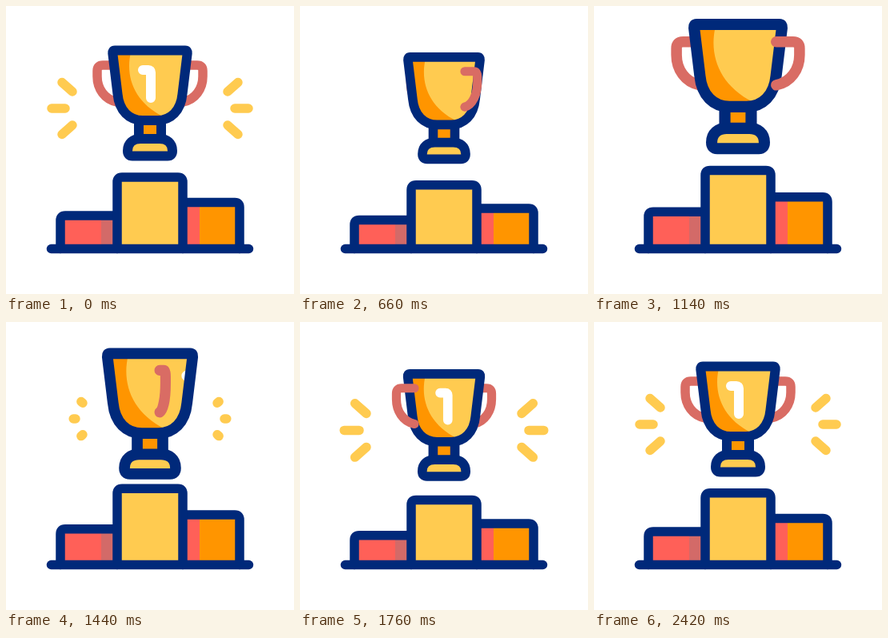
An HTML page that plays this animation: 360x360 px, repeating every 2.74 s.

```html
<!DOCTYPE html>
<html lang="en">
<head>
<meta charset="utf-8">
<title>Trophy on a podium</title>
<style>
  html, body { margin: 0; width: 100%; height: 100%; overflow: hidden; background: #fff; }
  svg { display: block; width: 100vw; height: 100vh; }
  .line, .handle, .digit { fill: none; stroke-width: 12; stroke-linecap: round; stroke-linejoin: round; }
  .line { stroke: #00297a; }
  .handle { stroke: #d96c64; stroke-width: 11.5; }
  .digit { stroke: #fff; }
  #podium .line { stroke-width: 11.5; }
  .ray { stroke: #ffcb50; stroke-linecap: round; }
  .yellow { fill: #ffcb50; }
  .orange { fill: #ff9500; }
  .red { fill: #ff6058; }
  .shadow { fill: #d36a68; }
</style>
</head>
<body>
<svg viewBox="0 0 360 360">
  <defs>
    <path id="cup" d="M136 55.500H224Q227 55.500 226.700 59L220.500 110C218.500 131 206 143 189 143H171C154 143 141.500 131 139.500 110L133.300 59Q133 55.500 136 55.500Z"/>
    <path id="foot" d="M152 181C152 171 159 166 168 166H192C201 166 208 171 208 181Q208 187.500 202 187.500H158Q152 187.500 152 181Z"/>
    <clipPath id="inside"><use href="#cup"/></clipPath>
  </defs>
  <g id="rays"></g>
  <g id="podium">
    <path id="leftFill" class="red"/>
    <path id="leftShade" class="shadow"/>
    <path id="rightFill" class="orange"/>
    <path id="rightShade" class="red"/>
    <path id="leftLine" class="line"/>
    <path id="rightLine" class="line"/>
    <path id="middleFill" class="yellow"/>
    <path id="middleLine" class="line"/>
    <path class="line" d="M56.500 303.500H303.500"/>
  </g>
  <g id="trophy">
    <g id="behind"></g>
    <path class="orange" d="M166 143H194V166H166Z"/>
    <path class="line" d="M166 143V166M194 143V166"/>
    <use href="#foot" class="yellow"/>
    <use href="#foot" class="line"/>
    <use href="#cup" class="yellow"/>
    <g clip-path="url(#inside)">
      <path class="orange" d="M130 50H157L156 58C149 88 160 120 196 138V146H130Z"/>
      <path id="digit" class="digit" d="M171 80H178Q181 80 181 83V115"/>
    </g>
    <use href="#cup" class="line"/>
    <g id="front"></g>
  </g>
</svg>
<script>
const LOOP = 2740, STEP = 20, AXIS = 180, FLOOR = 303.5, DIGIT_LENGTH = 45;
const byId = id => document.getElementById(id);
const set = (node, attrs) => {
  for (const name in attrs) node.setAttribute(name, attrs[name]);
};
const make = (parent, tag, className) => {
  const node = document.createElementNS('http://www.w3.org/2000/svg', tag);
  node.setAttribute('class', className);
  return parent.appendChild(node);
};

const ease = (time, from, to) => {
  const p = Math.min(1, Math.max(0, (time - from) / (to - from)));
  return p * p * (3 - 2 * p);
};
const mix = (a, b, amount) => a + (b - a) * amount;

// The jump: crouch, rise, hang, fall, rebound, settle.
function jump(time, { rest, crouch, peak, landing, rebound }) {
  let value = mix(rest, crouch, ease(time, 220, 450));
  value = mix(value, peak, ease(time, 450, 1130));
  value = mix(value, landing, ease(time, 1250, 1720));
  value = mix(value, rebound, ease(time, 1720, 2000));
  return mix(value, rest, ease(time, 2000, 2420));
}

// The trophy moves slightly ahead of the stretch that follows it.
const LEAD = 30, LAG = 60;
const trophyCentre = time => jump(time + LEAD,
  { rest: 121, crouch: 138, peak: 100, landing: 131, rebound: 114.5 });
const trophySize = time => jump(time - LAG,
  { rest: 1, crouch: .935, peak: 1.18, landing: .97, rebound: 1 });
const podiumStretch = time => jump(time - LAG,
  { rest: 1, crouch: .86, peak: 1.1, landing: .905, rebound: 1.032 });

// Two overlapping half turns.
const spin = time => Math.PI * (ease(time, 430, 1100) + ease(time, 1020, 1965));

const handles = [1, -1].map(side => ({ side, node: make(byId('behind'), 'path', 'handle') }));
const rays = [-1, 1].flatMap(side => [-1, 0, 1].map(row =>
  ({ side, row, node: make(byId('rays'), 'line', 'ray') })));

function drawHandle({ side, node }, angle) {
  const x = radius => AXIS + side * radius * Math.cos(angle);
  set(node, { d: `M${x(41)} 74H${x(59)}Q${x(66)} 74 ${x(66)} 81V88C${x(66)} 103 ${x(57)} 117 ${x(41)} 120` });
  const layer = byId(side * Math.sin(angle) > .01 ? 'front' : 'behind');
  if (node.parentNode !== layer) layer.appendChild(node);
}

function drawRays(time, y) {
  const shrink = 1 - ease(time, 220, 400), grow = ease(time, 1380, 1640);
  const since = Math.max(0, time - 1640);
  const wobble = .2 * Math.cos(Math.PI * since / 380) * (1 - ease(time, 1640, 2420));
  const length = shrink + grow * (1 + wobble);
  const inset = 15 * (1 - shrink - grow);
  for (const { side, row, node } of rays) {
    const x = (row ? 97 : 106) - inset;
    const dy = row * (21 - inset * .1);
    set(node, {
      x1: AXIS + side * x,
      y1: y + dy,
      x2: AXIS + side * (x + (row ? 13 : 17) * length),
      y2: y + dy + row * 11.5 * length,
      'stroke-width': 11.5 * Math.min(1, length * 8)
    });
  }
}

const block = (x0, x1, top) => `M${x0} ${FLOOR}V${top}H${x1}V${FLOOR}Z`;
// Outline from the floor up at x0, round the corner and on to x1.
const corner = (x0, x1, top) => {
  const radius = 6 * Math.sign(x1 - x0);
  return `M${x0} ${FLOOR}V${top + 6}Q${x0} ${top} ${x0 + radius} ${top}H${x1}`;
};

function drawPodium(stretch) {
  const sides = stretch ** 1.2;
  const middle = FLOOR - 89.5 * stretch;
  const left = FLOOR - 41.5 * sides, right = FLOOR - 58 * sides;
  const paths = {
    leftFill: block(70, 139, left),
    leftShade: block(119, 139, left),
    rightFill: block(221, 290, right),
    rightShade: block(221, 242, right),
    middleFill: block(141, 219, middle + 1),
    leftLine: corner(68, 139, left),
    rightLine: corner(292, 221, right),
    middleLine: corner(139, AXIS, middle) + corner(221, AXIS, middle)
  };
  for (const id in paths) set(byId(id), { d: paths[id] });
}

// The digit is wiped away, then slides back in from the right edge.
function drawDigit(time) {
  const returning = time >= 1354;
  const length = returning ? DIGIT_LENGTH : DIGIT_LENGTH * (1 - ease(time, 260, 560));
  const shift = returning ? 54 * (1 - ease(time, 1354, 1840)) : 0;
  set(byId('digit'), {
    visibility: length > .1 ? 'visible' : 'hidden',
    'stroke-dasharray': `${length} 99`,
    transform: `translate(${shift} 0)`
  });
}

function draw(time) {
  const centre = trophyCentre(time), angle = spin(time);
  set(byId('trophy'), {
    transform: `translate(${AXIS} ${centre}) scale(${trophySize(time)}) translate(${-AXIS} -121)`
  });
  handles.forEach(handle => drawHandle(handle, angle));
  drawRays(time, centre + 7);
  drawDigit(time);
  drawPodium(podiumStretch(time));
}

const start = performance.now();
function tick() {
  const time = (performance.now() - start) % LOOP;
  draw(Math.floor(time / STEP) * STEP);
  requestAnimationFrame(tick);
}
tick();
</script>
</body>
</html>
```
